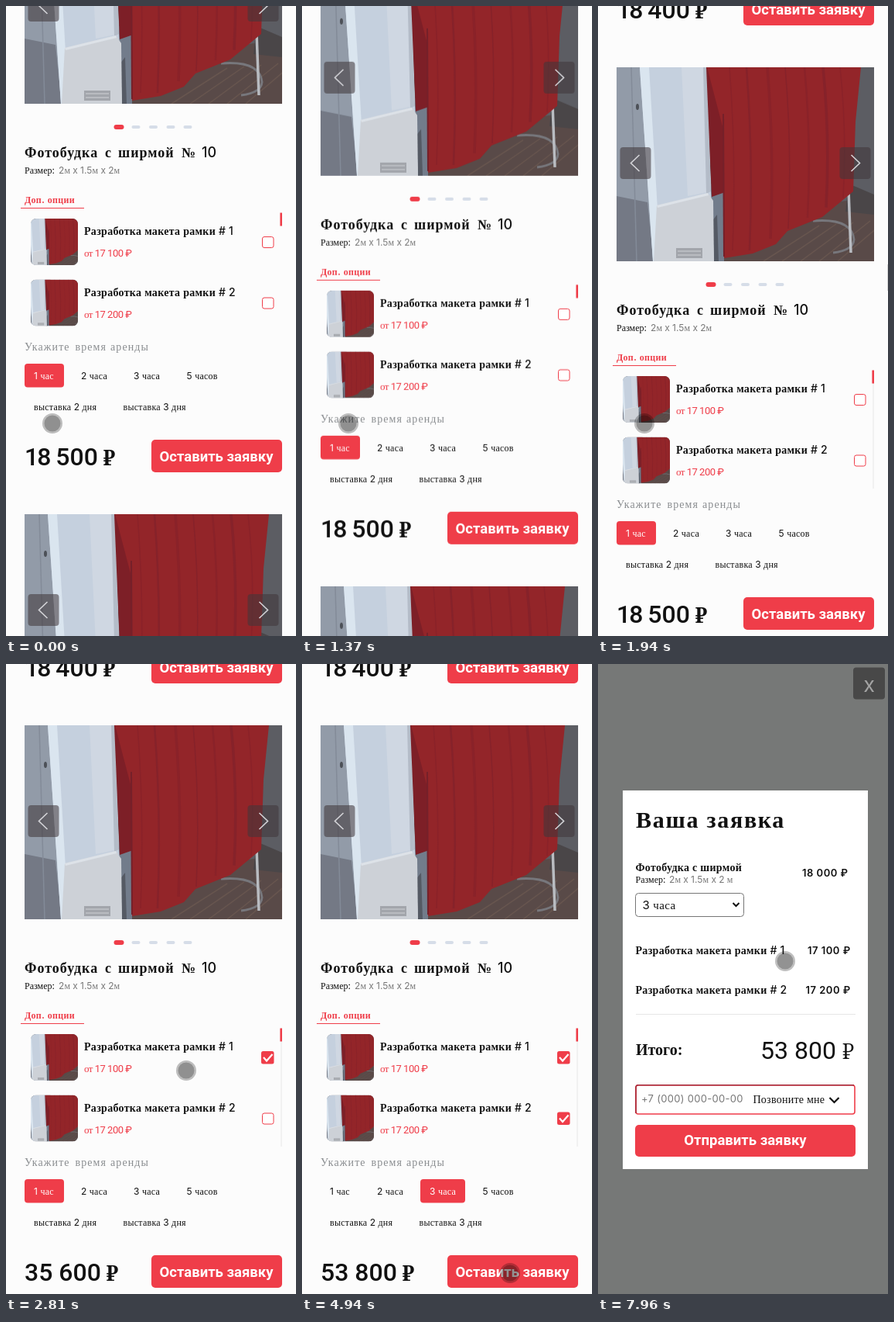
Recreate the animation shown at these times as an HTML page. Size 375x812 px, loop 8 s.

```html
<!DOCTYPE html>
<html lang="ru">
<head>
<meta charset="utf-8">
<title>Аренда фотобудки</title>
<style>
html, body { margin: 0; width: 100%; height: 100%; overflow: hidden; background: #fcfcfc; }
svg#stage { display: block; width: 375px; height: 812px; }
text { font: 12px "Liberation Serif", serif; fill: #111; }
.l { font-family: Inter, sans-serif; }
.title { font-size: 18px; font-weight: 700; letter-spacing: 1px; }
.num { font: 500 18px Inter, sans-serif; }
.name { font-size: 14px; font-weight: 700; letter-spacing: .3px; }
.name .l { font-weight: 500; }
.soft { fill: #777; letter-spacing: .1px; }
.tab { font-weight: 700; letter-spacing: .3px; fill: #ef3d49; }
.fee { font: 13px Roboto, sans-serif; letter-spacing: -.5px; fill: #ef3d49; }
.ask { font-size: 14px; letter-spacing: 1.1px; fill: #8a8d90; }
.hour { letter-spacing: .25px; }
.on { fill: #fff; }
.sum { font: 500 32px Roboto, sans-serif; }
.rub { font: 700 27px "Noto Serif", serif; }
.cta { font: 700 18.5px Roboto, sans-serif; fill: #fff; text-anchor: middle; }
.head { font-size: 30px; font-weight: 700; letter-spacing: 1.7px; }
.cost { font: 600 13px Inter, sans-serif; letter-spacing: .5px; }
.pick { font-size: 15px; letter-spacing: .4px; }
.total { font-size: 20px; font-weight: 700; }
.light { font-weight: 400; }
.phone { font: 13px Inter, sans-serif; letter-spacing: .3px; fill: #777; }
.call { font-size: 14px; letter-spacing: .25px; }
.close { font: 27px Inter, sans-serif; fill: #a3a3a3; text-anchor: middle; }
.line { fill: none; }

#page { animation: scroll 8s infinite; }
@keyframes scroll {
  0%, 15.15% { transform: translateY(0); animation-timing-function: ease-in-out; }
  17.65%, 21.56% { transform: translateY(101.5px); animation-timing-function: ease-in-out; }
  24.06%, 100% { transform: translateY(203px); }
}
#cursor { animation: move 8s ease-in-out infinite; }
@keyframes move {
  0%, 26.9% { transform: translate(60px, 538px); }
  32.6%, 35.2% { transform: translate(233px, 524px); }
  39%, 41% { transform: translate(225px, 580px); }
  47.1% { transform: translate(177px, 679px); }
  54% { transform: translate(177px, 679px); animation-timing-function: ease-in; }
  57.75% { transform: translate(232px, 724px); animation-timing-function: ease-out; }
  61.75%, 85.6% { transform: translate(269px, 785px); animation-timing-function: linear; }
  88.5% { transform: translate(269px, 766px); }
  90.2% { transform: translate(269px, 766px); animation-timing-function: ease-in; }
  94.5% { transform: translate(279px, 560px); animation-timing-function: ease-out; }
  99.5%, 100% { transform: translate(242px, 383px); }
}
</style>
</head>
<body>
<svg id="stage" viewBox="0 0 375 812"></svg>
<script>
const RED = '#ef3d49', LOOP = 8000;
let css = '';

// Visible only between two times of the loop.
const during = (a, b, body) => {
  const id = `s${a}-${b}`;
  css += `@keyframes ${id}{0%{visibility:${a ? 'hidden' : 'visible'}}
    ${a / LOOP * 100}%{visibility:visible}${b / LOOP * 100}%{visibility:hidden}}`;
  return `<g style="animation:${id} 8s step-end infinite">${body}</g>`;
};
const raw = (x, y, s, cls) => `<text x="${x}" y="${y}" class="${cls}">${s}</text>`;
// Digits and signs use the sans face, Cyrillic the serif one.
const text = (x, y, s, cls = '') =>
  raw(x, y, s.replace(/[\d#:+().x]+/g, m => `<tspan class="l">${m}</tspan>`), cls);
const rect = (x, y, w, h, fill, r = 0, more = '') =>
  `<rect x="${x}" y="${y}" width="${w}" height="${h}" rx="${r}" fill="${fill}" ${more}/>`;
const poly = (points, fill) => `<polygon points="${points}" fill="${fill}"/>`;
const line = (d, color, w = 2) =>
  `<path class="line" d="${d}" stroke="${color}" stroke-width="${w}"/>`;

const folds = [150, 172, 199, 222, 247, 271, 293].map((x, i) => {
  const end = 236 - Math.max(0, x - 172) * .56;
  return line(`M${x - 4} 0Q${x + 5} ${end / 2} ${x} ${end}`, i % 2 ? '#86222a' : '#8a2229', i % 3 + 1.5);
}).join('');
const planks = [0, 1, 2, 3, 4].map(i =>
  line(`M${190 + i * 24} 250L${262 + i * 22} ${204 - i * 2}`, '#68564f', 1.5)).join('');

const photoDefs = `<symbol id="photo" viewBox="0 0 333 250" preserveAspectRatio="xMidYMid slice">
  ${rect(0, 0, 333, 250, '#5c5d63')}
  ${poly('0,0 32,0 48,250 0,250', '#929ba8')}
  ${poly('0,166 40,174 48,250 0,250', '#747985')}
  ${line('M19 0L26 250', '#838b98', 1.5)}
  <ellipse cx="27" cy="51" rx="2" ry="4" fill="#4d5158"/>
  ${poly('139,190 333,168 333,250 139,250', '#594a48')}
  ${planks}
  ${poly('300,150 333,164 333,190 296,186', '#4a4648')}
  ${poly('118,150 139,150 139,250 124,250', '#727c8b')}
  ${poly('122,200 130,190 132,250 125,250', '#555a64')}
  ${poly('30,0 117,0 122,160 126,250 47,250', '#c5d0de')}
  ${poly('30,0 42,0 57,250 47,250', '#dae5ef')}
  ${poly('84,0 117,0 122,160 92,166', '#cfd7e2')}
  ${poly('112,0 117,0 122,160 116,163', '#b4bcc8')}
  ${poly('52,178 118,162 125,172 126,250 48,250', '#cdd1d7')}
  ${poly('52,178 118,162 119,165 53,181', '#dde2e8')}
  ${rect(77, 233, 34, 13, '#a2a5ab')}
  ${line('M79 237H109M79 242H109', '#d0d2d6', 1)}
  ${line('M254 198Q304 194 307 222Q306 236 280 239', '#77777c', 3)}
  ${line('M300 158L303 239', '#b9bcc1', 3.5)}
  ${poly('116,0 145,0 143,160 123,167', '#7d1f27')}
  ${poly('117,0 316,0 309,70 306,160 266,193 221,211 206,228 176,240 139,246 138,80', '#932529')}
  ${folds}
  ${line('M138 60L139 244', '#75202a', 2)}
</symbol>
<clipPath id="round"><rect width="61" height="60" rx="7"/></clipPath>`;

const arrow = (x, y, dir) => rect(x, y, 40, 41, '#40383a', 4, 'fill-opacity=".57"') +
  line(`M${x + 20 + dir * -5} ${y + 10}l${dir * 11} 10.5l${dir * -11} 10.5`, '#d4d4d8', 1.6);
const photo = y => `<use href="#photo" x="24" y="${y}" width="333" height="250"/>` +
  arrow(28.5, y + 103, -1) + arrow(312.5, y + 103, 1);

const sum = (y, s) => {
  const kern = s[0] === '1' ? ' dx="0 -2 -2"' : '';
  return `<text x="24" y="${y}" class="sum"${kern}>${s}</text>` +
    raw(kern ? 125.5 : 129.5, y, '₽', 'rub');
};
const button = y => rect(188, y, 169, 42, RED, 5) + raw(272, y + 27.5, 'Оставить заявку', 'cta');

const option = (y, n, since) => `
  <g transform="translate(32 ${y})" clip-path="url(#round)"><use href="#photo" width="61" height="60"/></g>
  ${text(101, y + 21, `Разработка макета рамки # ${n}`, 'name')}
  ${raw(101, y + 49, `<tspan style="font-family:'Liberation Serif',serif">от</tspan> 17 ${n}00 ₽`, 'fee')}
  ${during(0, since, rect(331.5, y + 23.5, 14.5, 14, '#fff', 2.5, `stroke="${RED}"`))}
  ${during(since, LOOP, rect(330, y + 22, 16.5, 16.5, RED, 2.5) +
    line(`M333 ${y + 30}l4 4.5l7.5 -8.5`, '#fff', 2.2))}`;

const hours = [[36, 481, '1 час'], [97, 481, '2 часа'], [165, 481, '3 часа'],
  [233.5, 481, '5 часов'], [36, 521, 'выставка 2 дня'], [151.5, 521, 'выставка 3 дня']];
const hour = (i, on = '') => text(...hours[i], 'hour ' + on);

const card = `
  ${photo(-124)}
  ${rect(139.5, 153, 13, 6, RED, 3)}
  ${[162.5, 185, 207.5, 229.5].map(x => rect(x, 154, 11, 4, '#d6dde8', 2)).join('')}
  ${text(24, 195, 'Фотобудка', 'title')}${text(128, 195, 'с', 'title')}
  ${text(145, 195, 'ширмой', 'title')}${text(227, 195, '№', 'title')}
  ${raw(253, 195, '10', 'num')}
  ${text(24, 216, 'Размер:')}${text(68, 216, '2м x 1.5м x 2м', 'soft')}
  ${text(24, 254, 'Доп. опции', 'tab')}
  ${rect(19, 260, 82, 1, RED)}
  ${during(1740, LOOP, rect(355.5, 266, 1, 153, '#e6e6e6'))}
  ${rect(354.4, 266.5, 2.6, 17, RED)}
  ${option(274, 1, 2810)}
  ${option(352.5, 2, 3280)}
  ${text(24, 444, 'Укажите', 'ask')}${text(89.5, 444, 'время', 'ask')}${text(135, 444, 'аренды', 'ask')}
  ${[1, 3, 4, 5].map(i => hour(i)).join('')}
  ${during(0, 4030, rect(24, 461, 51, 30.5, RED, 4) + hour(0, 'on') + hour(2))}
  ${during(4030, LOOP, rect(153, 461, 58, 30.5, RED, 4) + hour(0) + hour(2, 'on'))}
  ${[[0, 2810, '18 500'], [2810, 3280, '35 600'], [3280, 4030, '52 800'], [4030, LOOP, '53 800']]
    .map(([a, b, s]) => during(a, b, sum(592, s))).join('')}
  ${button(559)}`;

const modal = `
  ${rect(0, 0, 375, 812, '#767877')}
  ${rect(330, 4.5, 41, 41, '#484848', 4)}
  ${raw(350.5, 35.5, 'x', 'close')}
  ${rect(32, 163, 317, 488, '#fff')}
  ${text(49, 211, 'Ваша', 'head')}${text(140.5, 211, 'заявка', 'head')}
  ${text(48.5, 267, 'Фотобудка с ширмой', 'name')}
  ${text(48.5, 282, 'Размер:')}${text(92, 282, '2м x 1.5м x 2 м', 'soft')}
  ${raw(264, 274, '18 000 ₽', 'cost')}
  ${rect(48.5, 295.5, 140, 30, '#fff', 4, 'stroke="#767676"')}
  ${text(57.5, 316, '3 часа', 'pick')}
  ${line('M174.5 308l4 4l4 -4', '#111')}
  ${text(48.5, 374, 'Разработка макета рамки # 1', 'name')}${raw(271, 374, '17 100 ₽', 'cost')}
  ${text(48.5, 425, 'Разработка макета рамки # 2', 'name')}${raw(268.5, 425, '17 200 ₽', 'cost')}
  ${rect(49, 451, 284, 1, '#e6e6e6')}
  ${text(49, 504, 'Итого:', 'total')}
  ${raw(210, 509, '53 800', 'sum light')}${raw(315.5, 509, '₽', 'rub light')}
  ${rect(49, 542.7, 283, 37.3, '#fff', 3, `stroke="${RED}" stroke-width="1.6"`)}
  ${line('M49 579V545.7Q49 542.7 52 542.7H331', '#a52a38', 1.6)}
  ${raw(56, 565, '+7 (000) 000-00-00', 'phone')}
  ${text(200.5, 566, 'Позвоните мне', 'call')}
  ${line('M299.5 559l6 6l6 -6', '#111', 2.2)}
  ${rect(48, 594, 285, 41, RED, 5)}
  ${raw(190.5, 620, 'Отправить заявку', 'cta')}`;

document.getElementById('stage').innerHTML = `
  <defs>${photoDefs}</defs>
  ${rect(0, 0, 375, 812, '#fcfcfc')}
  <g id="page">${sum(-187, '18 400')}${button(-220)}${card}${photo(655)}</g>
  ${during(1740, 2500, rect(374, 333, 1, 34, '#d4d4d4'))}
  ${during(6090, LOOP, modal)}
  <g id="cursor"><circle r="13" fill-opacity=".25"/><circle r="10.5" fill-opacity=".24"/></g>`;

const style = document.createElement('style');
style.textContent = css;
document.head.append(style);
</script>
</body>
</html>
```
